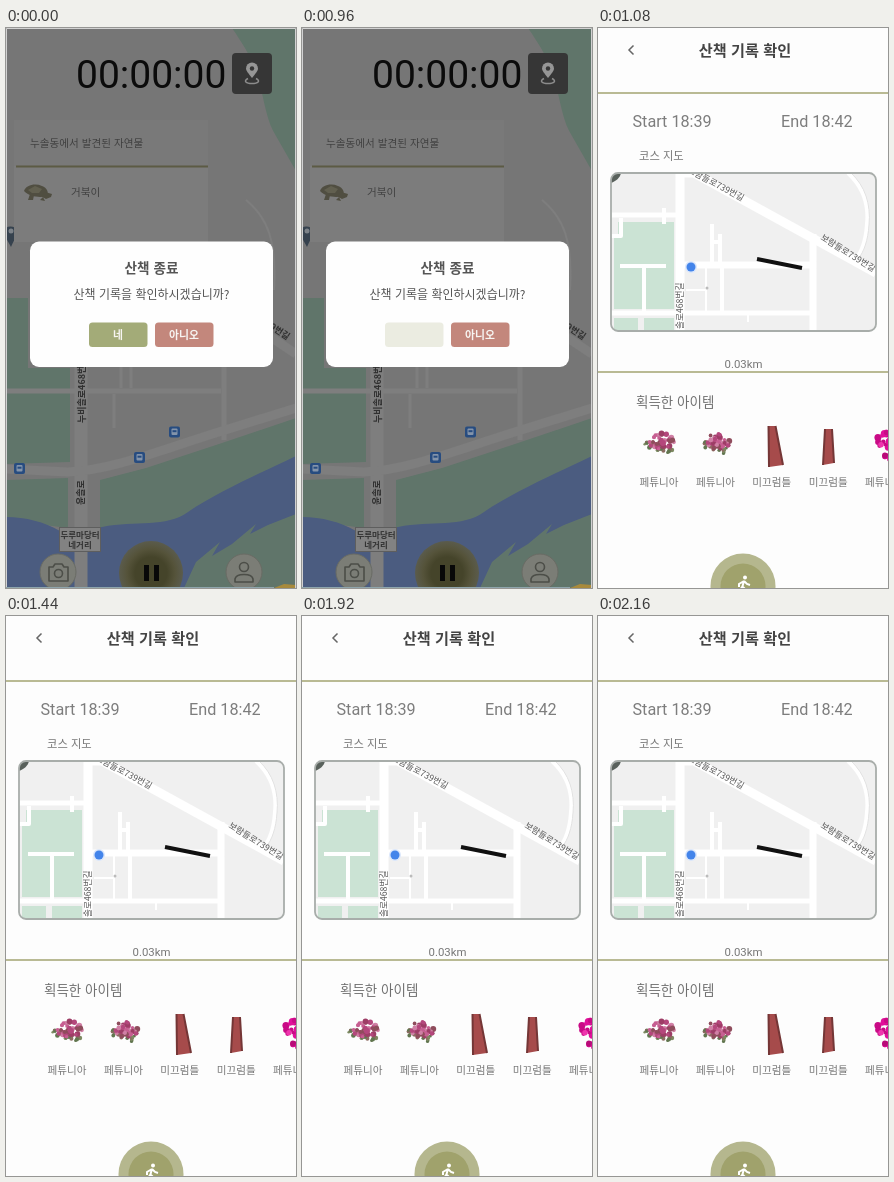
Recreate the animation shown at these times as an HTML page. Size 290 by 560 pixels, loop 2.64 s.

```html
<!DOCTYPE html>
<html lang="ko">
<head>
<meta charset="utf-8">
<title>산책 기록</title>
<style>
html, body { margin: 0; width: 100%; height: 100%; overflow: hidden; background: #fdfdfd; }
svg { display: block; width: 290px; height: 560px; }
text { font-family: "Noto Sans CJK KR", "Noto Sans CJK", "Noto Sans", sans-serif; }
.num { font-family: Roboto, "Noto Sans", sans-serif; }
.mid { text-anchor: middle; }
.road { fill: none; stroke-linejoin: round; }
</style>
</head>
<body>
<svg viewBox="0 0 290 560">
  <defs>
    <clipPath id="mapClip"><rect x="13" y="145" width="265" height="158" rx="7"/></clipPath>
    <radialGradient id="glow">
      <stop offset=".5" stop-color="#45442a"/>
      <stop offset=".75" stop-color="#55533a"/>
      <stop offset="1" stop-color="#5d5b43" stop-opacity=".85"/>
    </radialGradient>
    <g id="bus">
      <rect x="-5.5" y="-5.5" width="11" height="11" rx="2" fill="#274c80"/>
      <rect x="-3" y="-3.5" width="6" height="6.5" rx="1" fill="#8494aa"/>
      <path d="M-2 -1.8h4v2h-4z" fill="#274c80"/>
    </g>
  </defs>

  <g id="walk">
    <rect width="290" height="560" fill="#767676"/>
    <!-- map -->
    <g fill="#60756a">
      <path d="M226 0C238 18 248 32 253 54C259 74 260 92 270 108L290 143V0Z"/>
      <path d="M0 270H22V340H0ZM0 340H64V434L0 436ZM0 452L62 450V500L0 492Z"/>
      <path d="M94 452L140 440L210 417L290 390V560H94Z"/>
    </g>
    <path d="M0 489C20 489 38 494 54 503L96 499C130 492 160 500 182 484C212 464 248 448 290 428V486L262 497L244 506L250 496L226 516L206 528L214 514L190 534L178 560H0Z" fill="#4b5c80"/>
    <g class="road" stroke="#7e7e7e">
      <path d="M0 363H215M218 338V412" stroke-width="5"/>
      <path d="M75 338V560" stroke-width="13"/>
      <path d="M0 441L62 444C104 442 150 424 200 408L290 380" stroke-width="9"/>
      <path d="M86 190L290 326" stroke-width="9"/>
      <path d="M115 338V360M125 338V360M108 366V400" stroke-width="3"/>
      <path d="M240 172C262 190 271 214 268 262" stroke-width="2"/>
    </g>
    <g fill="#303030" font-size="9" font-weight="700">
      <text transform="translate(78.5 395) rotate(-90)">누비솔로468번길</text>
      <text transform="translate(78 477) rotate(-90)">윤솔로</text>
      <text transform="translate(263 300) rotate(34)">9번길</text>
      <text transform="translate(91 204) rotate(30)" fill="#666" font-size="8" font-weight="400">보람들로</text>
    </g>
    <use href="#bus" x="13.500" y="440.500"/>
    <use href="#bus" x="133.500" y="429.500"/>
    <use href="#bus" x="168.500" y="404"/>
    <path d="M5 219C1 211-2 208-2 203A7 7 0 0 1 11 203C11 208 8 212 5 219Z" fill="#36424e"/>
    <circle cx="5" cy="203" r="2.500" fill="#7c8288"/>
    <rect x="53.500" y="499.500" width="41" height="24" fill="#828282" stroke="#5e5e5e"/>
    <g class="mid" font-size="8.500" font-weight="700" fill="#333">
      <text x="74" y="509.500">두루마당터</text><text x="74" y="520">네거리</text>
    </g>

    <!-- header and found list -->
    <text class="num" x="70" y="59.500" font-size="39" fill="#0b0b0b">00:00:00</text>
    <rect x="226" y="25" width="40" height="41" rx="4" fill="#363636"/>
    <path d="M246 50C242 45 240 42.500 240 40.500A6 6 0 0 1 252 40.500C252 42.500 250 45 246 50Z" fill="#969696"/>
    <circle cx="246" cy="40.500" r="2.200" fill="#363636"/>
    <path d="M242 50.500C237 53 240 55.500 246 55.500S255 53 250 50.500" fill="none" stroke="#8c8c8c" stroke-width="1.500"/>
    <rect x="8" y="92" width="194" height="122" fill="#7c7c7c"/>
    <rect x="8" y="92" width="194" height="46" fill="#797979"/>
    <rect x="10" y="137.500" width="192" height="2" fill="#5c5b44"/>
    <text x="24" y="119" font-size="10.600" fill="#414141">누솔동에서 발견된 자연물</text>
    <text x="65" y="167.500" font-size="10.600" fill="#414141">거북이</text>
    <g fill="#504e41">
      <path d="M18 163C20 157 29 155 36 158C41 160 43 164 41 168C34 170 24 169 18 163Z"/>
      <path d="M39 164L46 166L45 169L40 171L35 168ZM28 167L27 172L22 172L24 166ZM37 169L39 173L34 172Z"/>
      <path d="M22 162L29 158L36 161L33 165L26 165Z" fill="#626050"/>
    </g>

    <!-- bottom controls -->
    <circle cx="145" cy="545" r="32" fill="url(#glow)"/>
    <path d="M138 537h5v16h-5zM148 537h5v16h-5z" fill="#080808"/>
    <g fill="#7b7d76" stroke="#696b64">
      <circle cx="52" cy="544" r="18"/><circle cx="238" cy="544" r="18"/>
    </g>
    <g fill="none" stroke="#4c4e48" stroke-width="1.600" stroke-linejoin="round">
      <path d="M43 539H47L49 536H56L58 539H62V553H43Z"/><circle cx="52.500" cy="545.500" r="4"/>
      <circle cx="238" cy="539" r="4.500"/><path d="M229 554V551C230 545 246 545 247 551V554Z"/>
    </g>
    <path d="M268 560L278 556L290 557V560Z" fill="#a88a3c"/>

    <!-- dialog -->
    <rect x="24" y="213.500" width="243" height="125.500" rx="9" fill="#fefefe"/>
    <g class="mid">
      <text x="145.500" y="245" font-size="13.600" font-weight="700" fill="#555">산책 종료</text>
      <text x="145.500" y="270.500" font-size="12" fill="#555">산책 기록을 확인하시겠습니까?</text>
      <rect id="yes" x="83" y="294.500" width="58.500" height="24.500" rx="3.500" fill="#a3ab78"/>
      <rect x="149" y="294.500" width="58.500" height="24.500" rx="3.500" fill="#c3877c"/>
      <g font-size="10.800" font-weight="700" fill="#f7f5f2">
        <text id="yesText" x="112" y="310.500">네</text><text x="178" y="310.500">아니오</text>
      </g>
    </g>
    <path d="M.5 560V.5H289.500V560" fill="none" stroke="#d2d2d2"/>
    <path d="M0 559.500H268" stroke="#8fa5ac"/>
  </g>

  <g id="record" visibility="hidden">
    <rect width="290" height="560" fill="#fdfdfd"/>
    <path d="M35.500 17.500L31 22L35.500 26.500" fill="none" stroke="#666" stroke-width="1.500"/>
    <text class="mid" x="147" y="27.500" font-size="15.200" font-weight="700" fill="#444">산책 기록 확인</text>
    <path d="M0 65H290M0 344H290" stroke="#b9ba94" stroke-width="2"/>
    <g font-size="16.200" fill="#7d7d7d">
      <text class="num" x="34.500" y="99">Start 18:39</text><text class="num" x="183" y="99">End 18:42</text>
    </g>
    <text x="41" y="132" font-size="11.300" fill="#777">코스 지도</text>

    <g clip-path="url(#mapClip)">
      <rect x="13" y="145" width="265" height="158" fill="#f0f0f0"/>
      <path d="M13 145H23C22 150 18 153 13 155Z" fill="#59615c"/>
      <path d="M20 194H76V281H16V207H20Z" fill="#cbe3d4"/>
      <path d="M16 290H40V303H16ZM46 290H76V303H46Z" fill="#cbe3d4"/>
      <g class="road" stroke="#fff">
        <path d="M82 145V303M82 145L96 145L278 245" stroke-width="9"/>
        <path d="M82 237H215M215 206V303" stroke-width="7"/>
        <path d="M13 187H80M13 285H212" stroke-width="5"/>
        <path d="M22 238H68M46 238V284M23 190V208H13M114 196V236M122 206V236M112 214H124M124 238V284M66 180V196" stroke-width="4"/>
        <path d="M108 240V284M88 262H108M150 284V294" stroke-width="2"/>
        <path d="M250 145C264 158 271 176 269 196C268 212 264 224 257 232" stroke-width="4"/>
      </g>
      <path d="M253 145C267 158 273 176 271 197C270 212 266 224 260 231" class="road" stroke="#e2e2e2"/>
      <g font-size="8.700" fill="#555">
        <text transform="translate(89 144) rotate(28)">보람들로739번길</text>
        <text transform="translate(222 211) rotate(32)">보람들로739번길</text>
        <text transform="translate(84.500 317) rotate(-90)">누비솔로468번길</text>
      </g>
      <circle cx="109" cy="260" r="1.500" fill="#bbb"/>
      <path d="M159 231L204 240" stroke="#111" stroke-width="4"/>
      <circle cx="93" cy="239" r="6" fill="#dbe7fb"/><circle cx="93" cy="239" r="4.500" fill="#4384ea"/>
    </g>
    <rect x="13" y="145" width="265" height="158" rx="7" fill="none" stroke="#a8adaa" stroke-width="1.800"/>

    <text class="num mid" x="145.500" y="340" font-size="11.400" fill="#777">0.03km</text>
    <text x="38" y="378.500" font-size="13.500" fill="#707070">획득한 아이템</text>
    <g id="items"></g>
    <g class="mid" id="labels" font-size="10.600" fill="#777"></g>

    <circle cx="145" cy="558" r="32.500" fill="#b5b78e"/>
    <circle cx="145" cy="558" r="22.500" fill="#a0a26c"/>
    <circle cx="147" cy="549.500" r="2" fill="#fff"/>
    <path d="M146 553L144 560M146 553L141 556V559M146 553L149 556L152 557M144 558L147 561M144 559L141 564" fill="none" stroke="#fff" stroke-width="2"/>
  </g>
</svg>

<script>
const LOOP = 2640, PRESS = 960, SHOW_RECORD = 1080;
const $ = id => document.getElementById(id);

function random(seed) {
  return () => (seed = seed * 16807 % 2147483647) / 2147483647;
}

// An oval cluster of small blobs, colours picked at random.
function cluster(cx, cy, rx, ry, count, size, colors, seed) {
  const rnd = random(seed);
  let out = '';
  for (let i = 0; i < count; i++) {
    const a = rnd() * Math.PI * 2, d = Math.sqrt(rnd());
    const x = cx + Math.cos(a) * d * rx, y = cy + Math.sin(a) * d * ry;
    const color = colors[Math.floor(rnd() * colors.length)];
    out += `<circle cx="${x.toFixed(1)}" cy="${y.toFixed(1)}" r="${(size * (.6 + rnd() * .6)).toFixed(1)}" fill="${color}"/>`;
  }
  return out;
}

function bouquet(cx, cy, seed) {
  const leaves = ['#61764f', '#7d8a62', '#8d6c62'];
  const petals = ['#b4477c', '#c75f92', '#9d3d66', '#d080a5', '#8f4c5c'];
  return cluster(cx - 11, cy + 2, 5, 4, 9, 2, leaves, seed) +
    cluster(cx + 4, cy + 7, 8, 4, 12, 2, leaves, seed + 5) +
    cluster(cx + 1, cy - 2, 13, 8, 38, 2.6, petals, seed + 9);
}

function slide(cx, top, height, topWidth, footWidth, lean) {
  const l = cx - lean - topWidth / 2, r = l + topWidth;
  const fl = cx + lean - footWidth / 2, fr = fl + footWidth, foot = top + height;
  return `<path d="M${l} ${top}H${r}L${fr} ${foot - 2}L${fl} ${foot}Z" fill="#a64b4b"/>` +
    `<path d="M${l} ${top}L${fl} ${foot}M${r} ${top}L${fr} ${foot - 2}" stroke="#743636" stroke-width="2"/>`;
}

$('items').innerHTML =
  bouquet(62, 415, 71) + bouquet(119, 415, 392) +
  slide(176, 398, 41, 7, 14, 2) +
  slide(230.5, 401, 36, 7, 11, 0) +
  cluster(288, 412, 9, 9, 22, 3.2, ['#e0109a', '#c90b86', '#ef35ad'], 17) +
  cluster(289, 428, 4, 5, 8, 2.4, ['#d90f93', '#b80b78'], 29);

$('labels').innerHTML = ['페튜니아', '페튜니아', '미끄럼틀', '미끄럼틀', '페튜니아']
  .map((name, i) => `<text x="${61 + i * 56.4}" y="458">${name}</text>`).join('');

function draw() {
  const t = performance.now() % LOOP;
  const pressed = t >= PRESS, done = t >= SHOW_RECORD;
  $('yes').setAttribute('fill', pressed ? '#ebece1' : '#a3ab78');
  $('yesText').setAttribute('opacity', pressed ? 0 : 1);
  $('walk').setAttribute('visibility', done ? 'hidden' : 'visible');
  $('record').setAttribute('visibility', done ? 'visible' : 'hidden');
  requestAnimationFrame(draw);
}
draw();
</script>
</body>
</html>
```
